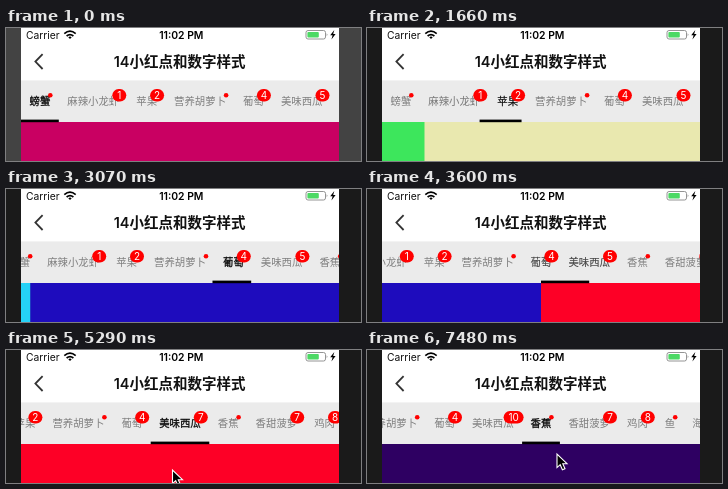
These frames come from a looping animation (355 by 133 pixels, 8000 ms). An HTML page:

```html
<!DOCTYPE html>
<html lang="zh-CN">
<head>
<meta charset="utf-8">
<title>Tab badges</title>
<style>
html, body { margin: 0; width: 355px; height: 133px; overflow: hidden; background: #1a1a1a; }
svg { display: block; }
text { font-family: Inter, "Noto Sans CJK SC", "Noto Sans CJK", "Noto Sans CJK JP", sans-serif; }
.tab { font-size: 10.4px; }
.num { font-size: 10px; fill: #fff; text-anchor: middle; }
</style>
</head>
<body>
<svg id="stage" width="355" height="133" viewBox="0 0 355 133">
  <defs>
    <clipPath id="screen"><rect x="15" width="318" height="133"/></clipPath>
  </defs>
  <rect id="backdrop" width="355" height="133"/>
  <g clip-path="url(#screen)">
    <rect x="15" width="318" height="53" fill="#fff"/>
    <text x="20" y="10.5" font-size="10.3" fill="#111">Carrier</text>
    <g fill="none" stroke="#000" stroke-width="1.7">
      <path d="M58.3 5.6Q64 .8 69.7 5.6M60.6 8Q64 5.1 67.4 8"/>
      <path d="M62.3 9.2Q64 7.8 65.7 9.2L64 11Z" fill="#000" stroke="none"/>
    </g>
    <text x="175.3" y="10.5" font-size="10.4" font-weight="600" text-anchor="middle">11:02 PM</text>
    <rect x="300" y="2.5" width="19.5" height="8.5" rx="2" fill="#fff" stroke="#888" stroke-width=".9"/>
    <rect x="301.4" y="3.9" width="11.4" height="5.7" rx="1" fill="#4cd964"/>
    <path d="M320.7 5.2Q322.4 6.7 320.7 8.3Z" fill="#888"/>
    <path d="M328.3 2L324.2 7.3H326.6L325.4 11.4L329.6 5.9H327.2Z"/>
    <path d="M36.6 26.2L29.4 33.6L36.6 41" fill="none" stroke="#333" stroke-width="1.8"/>
    <text x="173.6" y="39.2" font-size="14.5" font-weight="600" text-anchor="middle" fill="#111">14小红点和数字样式</text>
    <g id="pages"></g>
    <rect x="15" y="52.4" width="318" height="41.6" fill="#ebebeb"/>
    <g id="strip">
      <rect id="line" y="91.6" height="2.6"/>
    </g>
  </g>
  <path id="cursor" d="M0 0V13.6L3.2 10.7L5.4 15.8L8 14.7L5.8 9.7H10Z" fill="#000" stroke="#fff" stroke-width="1.1"/>
</svg>
<script>
const LOOP = 8000, LEFT = 15, WIDTH = 318, CHAR = 10.4, PAD = 17;
const GLIDE = 260, CENTRING = 300;
// label and badge: 0 is a plain dot, null is none
const tabs = [
  ['螃蟹', 0], ['麻辣小龙虾', 1], ['苹果', 2], ['营养胡萝卜', 0], ['葡萄', 4], ['美味西瓜', 5],
  ['香蕉', 0], ['香甜菠萝', 7], ['鸡肉', 8], ['鱼', 0], ['海鲜', null]
];
const pageColors = ['#c90062', '#3de65c', '#e9e8af', '#25d2f7', '#1e0cbd', '#fd0026', '#2e0062'];
// each swipe turns one page
const swipes = [
  { grab: 540, release: 814 }, { grab: 1250, release: 1610 }, { grab: 2080, release: 2440 },
  { grab: 2850, release: 2954 }, { grab: 3540, release: 3840 }, { grab: 6430, release: 6850 }
];
const pointers = [
  { from: 4070, to: 5980, x: 166.5, y: 120 },
  { from: 7130, to: LOOP, x: 190, y: 104 }
];

const $ = id => document.getElementById(id);
function set(el, attrs) {
  for (const key in attrs) el.setAttribute(key, attrs[key]);
}
function add(parent, name, attrs, text) {
  const el = document.createElementNS('http://www.w3.org/2000/svg', name);
  set(el, attrs);
  if (text !== undefined) el.textContent = text;
  return parent.appendChild(el);
}
const mix = (a, b, k) => a + (b - a) * k;
const clamp = (v, lo = 0, hi = 1) => Math.min(hi, Math.max(lo, v));
const ease = k => k * k * (3 - 2 * k);

let nextX = LEFT;
const items = tabs.map(([label, badge]) => {
  const item = { x: nextX, w: label.length * CHAR + PAD, badge };
  nextX += item.w;
  item.text = add($('strip'), 'text', { class: 'tab', x: item.x + PAD / 2, y: 77.4 }, label);
  return item;
});
for (const item of items) {
  const cx = item.x + item.w - PAD / 2;
  if (item.badge === 0) add($('strip'), 'circle', { cx, cy: 67.3, r: 2.3, fill: '#f00' });
  if (item.badge) {
    item.cx = cx;
    item.pill = add($('strip'), 'rect', { y: 61.1, height: 12.4, rx: 6.2, fill: '#f00' });
    item.num = add($('strip'), 'text', { class: 'num', x: cx, y: 70.9 });
    setBadge(item, item.badge);
  }
}
const pages = pageColors.map(fill => add($('pages'), 'rect', { y: 94, width: WIDTH + .5, height: 39, fill }));

function setBadge(item, n) {
  const width = n > 9 ? 20 : 14;
  set(item.pill, { x: item.cx - width / 2, width });
  item.num.textContent = n;
}

// Quick pull to half a page, a held pause, then a decelerating glide.
function swipeAt(t, { grab, release }) {
  if (t < grab) return 0;
  if (t < release) return mix(.23, .5, clamp((t - grab) / 60));
  return 1 - .32 * (1 - clamp((t - release) / GLIDE)) ** 4;
}

const pageAt = t => swipes.reduce((sum, s) => sum + swipeAt(t, s), 0);

// After each glide the strip centres the chosen tab.
function scrollAt(t) {
  return swipes.reduce((x, { release }, n) => {
    const tab = items[n + 1];
    const goal = Math.max(0, tab.x + tab.w / 2 - LEFT - WIDTH / 2);
    return mix(x, goal, ease(clamp((t - release - GLIDE) / CENTRING)));
  }, 0);
}

const countAt = t => 5 + clamp(1 + Math.floor((t - 4880) / 207), 0, 5);

function draw(t) {
  const p = pageAt(t);
  const i = Math.floor(p), k = p - i;
  const a = items[i], b = items[i + 1];

  set($('backdrop'), { fill: t < swipes[0].grab ? '#434343' : '#1a1a1a' });
  set($('strip'), { transform: `translate(${-scrollAt(t)} 0)` });
  set($('line'), { x: mix(a.x, b.x, k), width: mix(a.w, b.w, k) });
  pages.forEach((page, n) => set(page, { x: LEFT + (n - p) * WIDTH }));

  items.forEach(({ text }, n) => {
    const on = ease(clamp(1 - Math.abs(p - n)));
    const c = Math.round(mix(126, 10, on));
    const color = `rgb(${c},${c},${c})`;
    set(text, { fill: color, stroke: color, 'stroke-width': .26 * on });
  });
  setBadge(items[5], countAt(t));

  const spot = pointers.find(({ from, to }) => t >= from && t < to);
  set($('cursor'), spot
    ? { visibility: 'visible', transform: `translate(${spot.x} ${spot.y})` }
    : { visibility: 'hidden' });
}

const begin = performance.now();
function tick() {
  draw((performance.now() - begin) % LOOP);
  requestAnimationFrame(tick);
}
draw(0);
requestAnimationFrame(tick);
</script>
</body>
</html>
```
